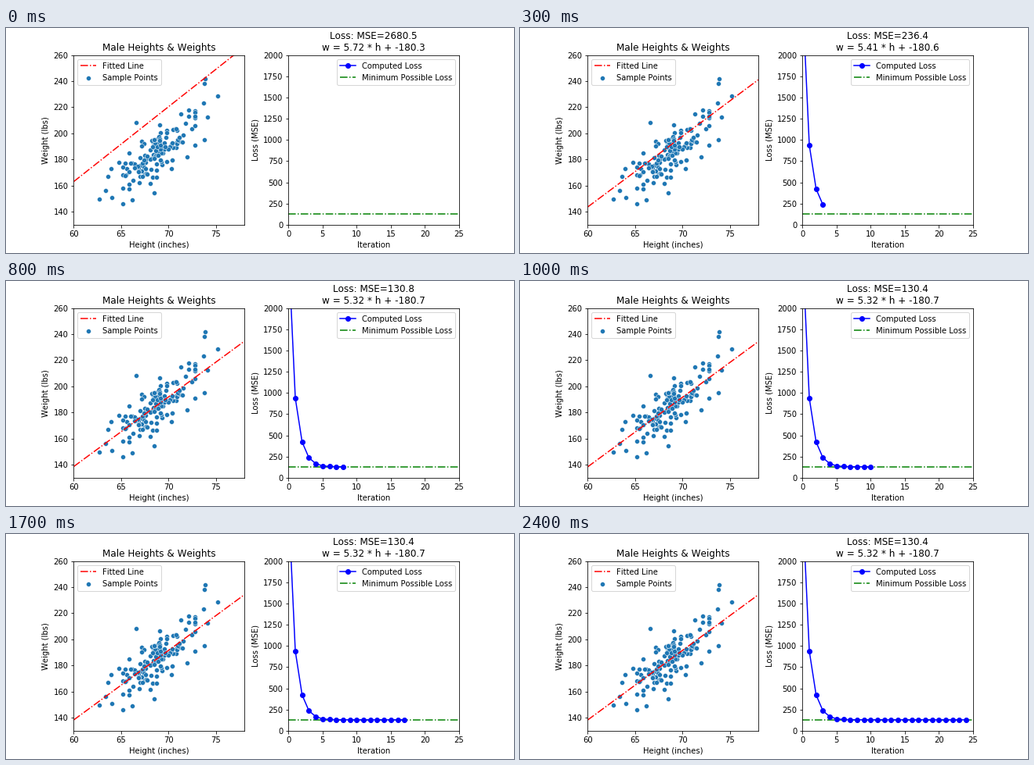
These frames come from a looping animation (648x288 px, 2.5 s). A matplotlib script:

```python
import numpy as np
import matplotlib.pyplot as plt
from matplotlib.animation import FuncAnimation

plt.rcParams["text.kerning_factor"] = 6

STEPS = 25
MIN_LOSS = 130.4
SLOPE, BIAS = 5.318, -180.7
MEAN_HEIGHT = 70
DECAY = 0.33


def sample_people(n, seed=4):
    """Heights and weights along the trend, plus a few outliers."""
    rng = np.random.default_rng(seed)
    h = np.clip(rng.normal(68.8, 2.0, n), 65.2, 72.8)
    off = np.clip(rng.normal(-1, 9.5, n), -20, 20)
    outliers = [(62.7, 149.7), (63.4, 156.3), (64.0, 150.9), (63.6, 167.0),
                (63.9, 173.0), (64.8, 177.8), (66.2, 149.1), (66.6, 208.3),
                (68.5, 154.5), (73.8, 195.2), (73.7, 223.2), (73.8, 238.2),
                (73.9, 241.8), (74.1, 212.7), (75.2, 228.6)]
    return np.vstack([np.column_stack([h, SLOPE * h + BIAS + off]), outliers])


# Noisy first steps, then steady geometric decay towards the minimum
first = np.array([2680.5, 938, 422, 236.4, 168, 141.4, 133.9]) - MIN_LOSS
tail = first[-1] * DECAY ** np.arange(1, STEPS + 2 - len(first))
excess = np.concatenate([first, tail])
loss = MIN_LOSS + excess

fig, (fit_ax, loss_ax) = plt.subplots(1, 2, figsize=(9, 4), dpi=72)
fig.subplots_adjust(left=0.125, right=0.9, bottom=0.125, top=0.88, wspace=0.2)

xs = np.array([60, 78])
fit, = fit_ax.plot([], [], "r-.", lw=1.5, label="Fitted Line")
fit_ax.scatter(*sample_people(126).T, s=36, c="#1f77b4", edgecolors="w",
               linewidths=0.48, label="Sample Points")
fit_ax.set(xlim=(60, 78), ylim=(130, 260), xlabel="Height (inches)",
           ylabel="Weight (lbs)", title="Male Heights & Weights")
fit_ax.legend(loc="upper left")

curve, = loss_ax.plot([], [], "bo-", lw=1.5, ms=6, zorder=2.1,
                      label="Computed Loss")
loss_ax.plot([0, 25], [MIN_LOSS] * 2, "g-.", lw=1.5,
             label="Minimum Possible Loss")
loss_ax.set(xlim=(0, 25), ylim=(0, 2000), xlabel="Iteration",
            ylabel="Loss (MSE)", xticks=range(0, 26, 5),
            yticks=range(0, 2001, 250))
loss_ax.legend(loc="upper right")

for ax in (fit_ax, loss_ax):
    ax.set_box_aspect(1)


def update(k):
    # The line shows the weights after the step, the title the loss before it
    gap = np.sqrt(excess[k + 1]) / MEAN_HEIGHT
    w, b = SLOPE + gap, BIAS + gap
    fit.set_data(xs, w * xs + b)
    curve.set_data(np.arange(k + 1), loss[:k + 1])
    loss_ax.set_title(f"Loss: MSE={loss[k]:.1f}\nw = {w:.2f} * h + {b:.1f}")
    return fit, curve


anim = FuncAnimation(fig, update, frames=STEPS, interval=100, repeat=True,
                     repeat_delay=0, init_func=lambda: update(0))
plt.show()
```
